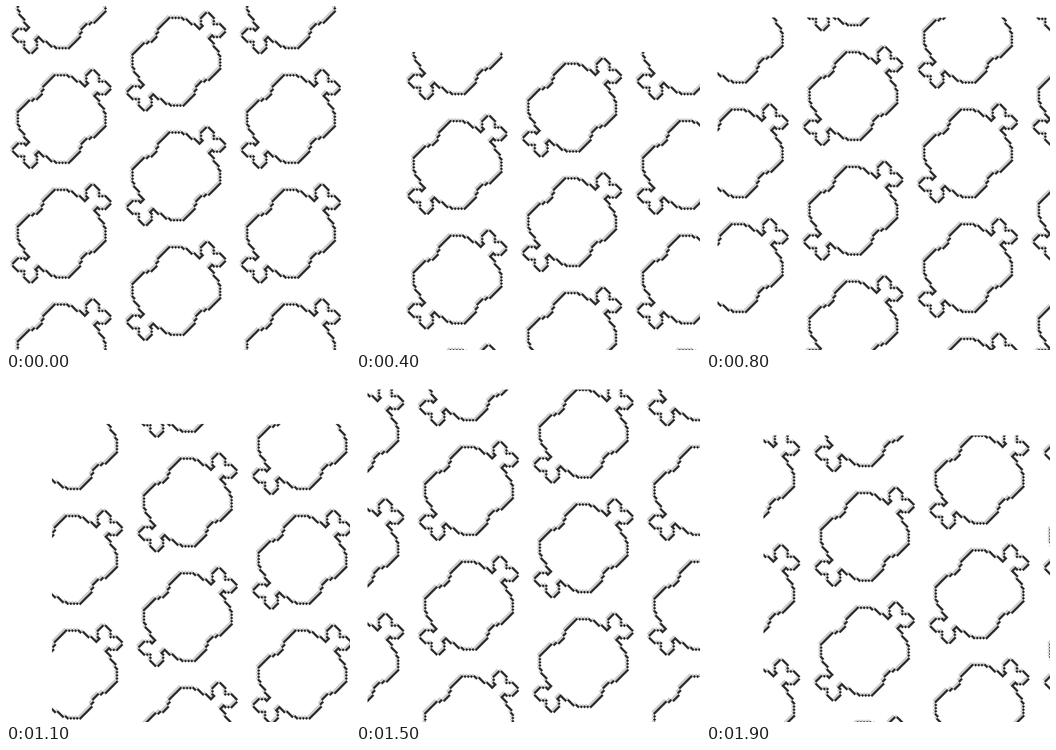
Recreate the animation shown at these times as an HTML page with a canvas. Size 748 by 748 pixels, loop 2 s.

```html
<!DOCTYPE html>
<html lang="en">
<head>
<meta charset="utf-8">
<title>Drifting pixel pattern</title>
<style>
html, body { margin: 0; width: 100%; height: 100%; overflow: hidden; background: #fff; }
canvas { display: block; width: 748px; height: 748px; }
</style>
</head>
<body>
<canvas id="stage" width="748" height="748"></canvas>
<script>
const SIZE = 748;
const PERIOD = 72;             // pattern period, in half diagonals of a cell
const H = SIZE / (3 * PERIOD); // half diagonal of a cell, in px
const STEP = SIZE / 30;        // drift per step, in px
const STEP_MS = 100, STEPS = 20, SWEEP = 7;
const DARK = '#323031', LIGHT = '#cdcdcd';
const GAP = { col: -1, row: 2 }; // the one empty place in the pattern

const ctx = document.getElementById('stage').getContext('2d');

// A quarter of the outline: runs of [dx, dy, count] from the first cell.
const START = [23.5, -23.5];
const RUNS = [
  // knob
  [0, -2, 2], [-1, -1, 3], [-2, 0, 1], [-1, 1, 3], [0, 2, 2], [1, 1, 1], [-1, 1, 2],
  // body
  [-1, -1, 3], [-2, 0, 1], [-1, -1, 3], [-2, 0, 1], [-1, -1, 1], [-2, 0, 4],
  [-1, 1, 7], [0, 2, 1], [-1, 1, 1], [0, 2, 1], [-1, 1, 1]
];

function outlineCells() {
  let [x, y] = START;
  const quarter = [[x, y]];
  for (const [dx, dy, count] of RUNS) {
    for (let i = 0; i < count; i++) quarter.push([x += dx, y += dy]);
  }
  // Mirror across both diagonals.
  return quarter.flatMap(([a, b]) => [[a, b], [-a, -b], [-b, -a], [b, a]]);
}

function diamondPath(cells, shift) {
  const path = new Path2D();
  for (const [cx, cy] of cells) {
    const x = (cx + shift) * H, y = (cy + shift) * H;
    path.moveTo(x, y - H);
    path.lineTo(x + H, y);
    path.lineTo(x, y + H);
    path.lineTo(x - H, y);
    path.closePath();
  }
  return path;
}

const cells = outlineCells();
const outline = diamondPath(cells, 0);
const shade = diamondPath(cells, -1);

function drawShape(x, y) {
  ctx.save();
  ctx.translate(x, y);
  ctx.fillStyle = LIGHT;
  ctx.fill(shade);
  ctx.fillStyle = DARK;
  ctx.fill(outline);
  ctx.restore();
}

function draw(step) {
  const drift = step * STEP;
  const edge = Math.round((step % SWEEP) * STEP);
  const margin = PERIOD / 2 * H;
  const visible = p => p > -margin && p < SIZE + margin;

  ctx.fillStyle = '#fff';
  ctx.fillRect(0, 0, SIZE, SIZE);
  ctx.save();
  ctx.beginPath();
  ctx.rect(edge, edge, SIZE, SIZE);
  ctx.clip();
  for (let col = -3; col < 4; col++) {
    const x = (35 + col * PERIOD) * H + drift;
    if (!visible(x)) continue;
    for (let row = -6; row < 6; row++) {
      if (col === GAP.col && row === GAP.row) continue;
      const y = (71 + (row + col / 2) * PERIOD) * H + drift;
      if (visible(y)) drawShape(x, y);
    }
  }
  ctx.restore();
}

const begin = performance.now();
function tick() {
  const t = performance.now() - begin;
  draw(Math.floor(t / STEP_MS) % STEPS);
  requestAnimationFrame(tick);
}
draw(0);
requestAnimationFrame(tick);
</script>
</body>
</html>
```
